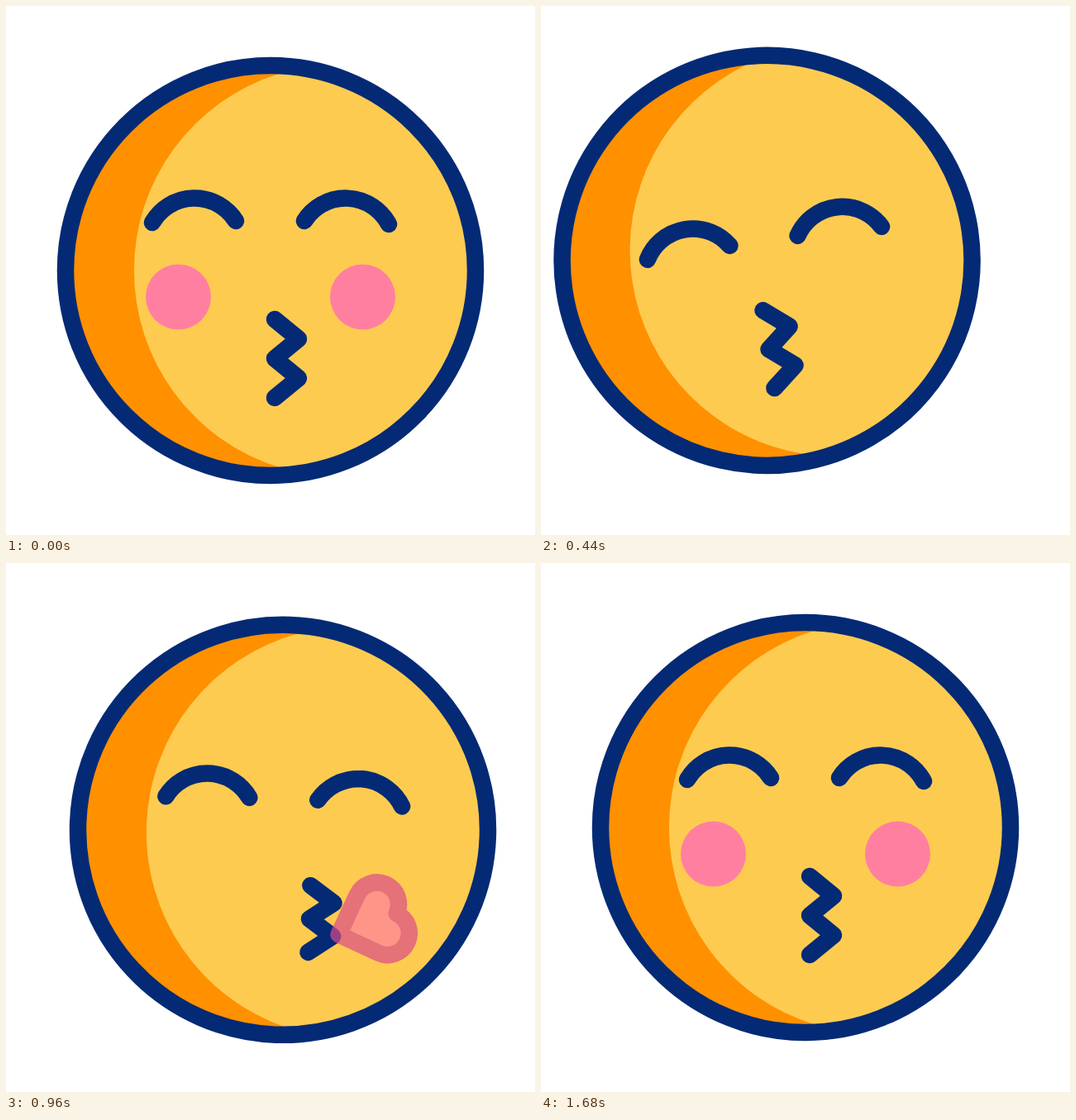
These frames come from a looping animation (640x640 px, 2000 ms). An HTML page:

```html
<!DOCTYPE html>
<html lang="en">
<head>
<meta charset="utf-8">
<title>Kiss</title>
<style>
  html, body { margin: 0; width: 100%; height: 100%; overflow: hidden; background: #fff; }
  svg { display: block; width: 100%; height: 100%; }
  .line { fill: none; stroke: #042a75; stroke-width: 20.5; stroke-linecap: round; stroke-linejoin: round; }
</style>
</head>
<body>
<svg viewBox="0 0 640 640">
  <g id="face">
    <circle r="248" fill="#ff9000"/>
    <path d="M10-238A238 238 0 0 1 10 238A249.3 249.3 0 0 1 10-238Z" fill="#fecb51"/>
    <circle class="line" r="248"/>
    <g id="cheeks" fill="#ff7fa0">
      <circle cx="-111.5" cy="32" r="39.5"/>
      <circle cx="111.5" cy="32" r="39.5"/>
    </g>
    <g id="eyes" class="line">
      <path d="M-143-58A59 59 0 0 1-42-60"/>
      <path d="M41-60A59 59 0 0 1 143-56"/>
    </g>
    <polyline id="mouth" class="line"/>
  </g>
  <path id="heart" fill="#ff7fa0" stroke="#db4c8a" stroke-width="20.5" stroke-linejoin="round"/>
</svg>
<script>
const LOOP = 2000, STEP = 40, END = 1680;
const [face, cheeks, eyes, mouth, heart] =
  ['face', 'cheeks', 'eyes', 'mouth', 'heart'].map(id => document.getElementById(id));

const set = (node, attrs) => {
  for (const name in attrs) node.setAttribute(name, attrs[name]);
};

// Progress from 0 to 1 between two times, straight or eased
const line = (t, from, to) => Math.min(1, Math.max(0, (t - from) / (to - from)));
const ease = (t, from, to) => {
  const s = line(t, from, to);
  return s * s * (3 - 2 * s);
};

// Eased travel by a distance that bows out sideways on the way
const bow = (u, distance, bulge) => distance * u + 2 * u * (1 - u) * bulge;

function drawFace(t) {
  const back = ease(t, 0, 320), over = ease(t, 330, 820), home = ease(t, 820, 1120);
  const x = 320 + bow(back, -54, -11) + bow(over, 84, -14.5) + bow(home, -30, -3);
  const y = 320 + bow(back, 1, 40.5) + bow(over, -13, -51) + bow(home, 12, 19);
  const turn = -22 * ease(t, 0, 240) + 29.3 * ease(t, 240, 660) - 7.3 * ease(t, 660, 1120);
  const nod = 65 * (ease(t, 280, 580) - ease(t, 640, 1170));
  const blush = 1 - line(t, 0, 373) + line(t, 1160, 1680);
  set(face, { transform: `translate(${x} ${y}) rotate(${turn})` });
  set(eyes, { transform: `translate(0 ${nod})` });
  set(cheeks, { opacity: blush });
}

function drawMouth(t) {
  const shift = 31 * (2 * ease(t, 700, 940) - ease(t, 280, 560) - ease(t, 940, 1300));
  const height = 23.75 * (1 - 0.3 * (ease(t, 465, 720) - ease(t, 720, 1200)));
  const points = [];
  for (let i = -2; i <= 2; i++) {
    points.push(shift + (i % 2 ? 34 : 5), 106.5 + i * height);
  }
  set(mouth, { points: points.join(' ') });
}

// A square standing on its corner with a half circle on each upper side
function heartPath(size) {
  const d = size / Math.SQRT2, r = size / 2;
  return `M0 0L${d} ${-d}A${r} ${r} 0 0 1 ${2 * d} 0A${r} ${r} 0 0 1 ${d} ${d}Z`;
}

function drawHeart(t) {
  const p = line(t, 850, 1503);
  set(heart, {
    d: heartPath(41 + 70 * p),
    transform: `translate(${370.5 + 190 * p} ${441.5 + 47.8 * p}) rotate(${-12.8 - 43 * p})`,
    opacity: line(t, 850, 1007) - line(t, 1007, 1503)
  });
}

const start = performance.now();
function tick() {
  const now = (performance.now() - start) % LOOP;
  const t = Math.min(END, Math.floor(now / STEP) * STEP);
  drawFace(t);
  drawMouth(t);
  drawHeart(t);
  requestAnimationFrame(tick);
}
tick();
</script>
</body>
</html>
```
